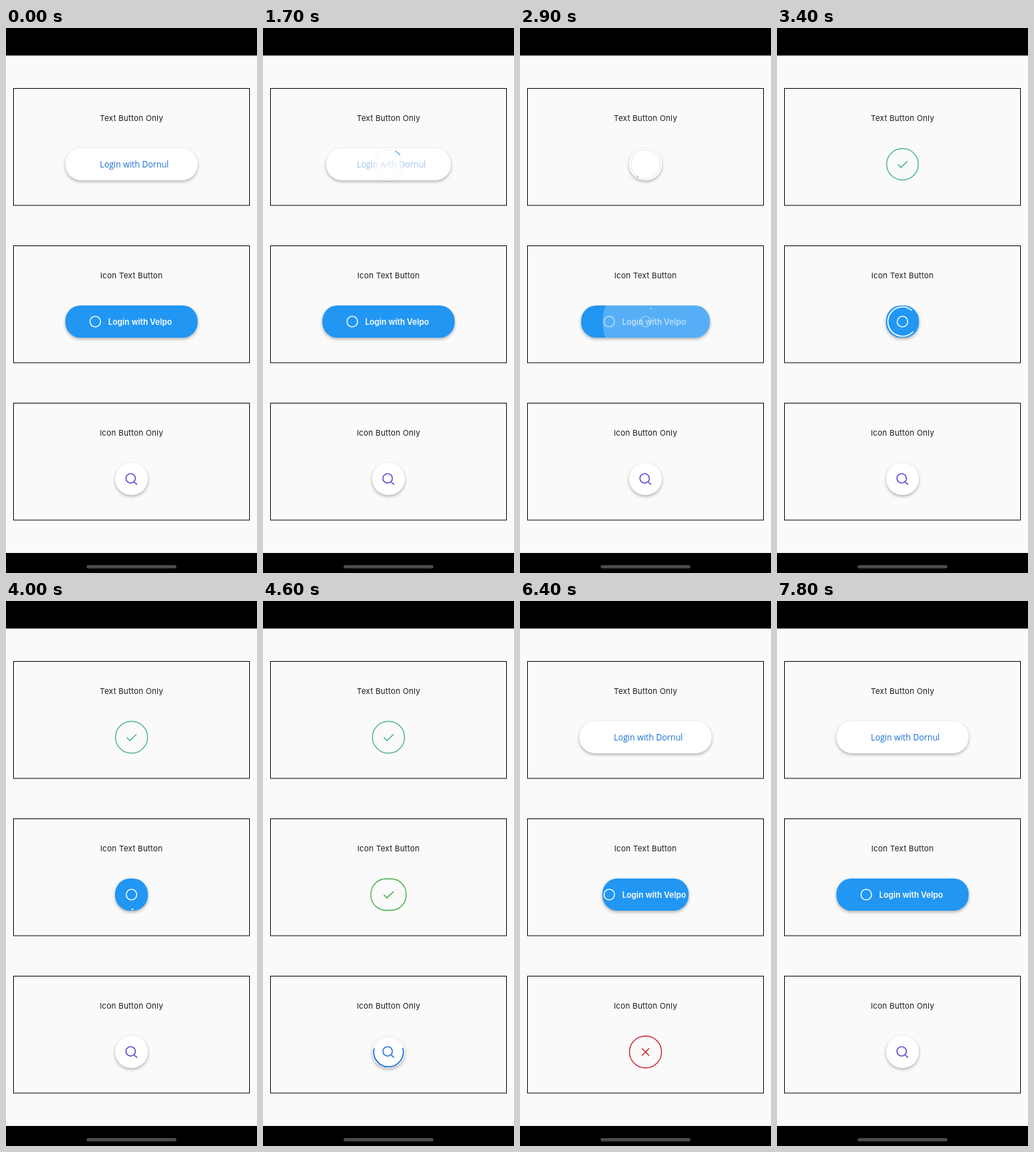
Write an HTML page that moves like this. It is 352 by 762 pixels and loops after 8.3 s.

```html
<!DOCTYPE html>
<html lang="en">
<head>
<meta charset="utf-8">
<title>Loading buttons</title>
<style>
  html, body { margin: 0; width: 100%; height: 100%; overflow: hidden; background: #fafafa; }
  svg { display: block; width: 352px; height: 762px; }
  .title { font: 400 11px Inter, sans-serif; letter-spacing: .18px; fill: #1c1c1c; text-anchor: middle; }
  .base { filter: drop-shadow(0 2.6px 1.9px rgba(0, 0, 0, .3)); }
  .line { fill: none; stroke-linecap: butt; }
</style>
</head>
<body>
<svg id="stage" viewBox="0 0 352 762" xmlns="http://www.w3.org/2000/svg"></svg>
<script>
const LOOP = 8300, STEP = 100;
const LOAD = 1400, BACK = 3465, RESIZE = 600;
const CX = 176, H = 45, ROUND = 46;
const stage = document.getElementById('stage');

function el(parent, tag, attrs, text) {
  const node = document.createElementNS('http://www.w3.org/2000/svg', tag);
  set(node, attrs);
  if (text) node.textContent = text;
  parent.appendChild(node);
  return node;
}
function set(node, attrs) {
  for (const key in attrs) node.setAttribute(key, attrs[key]);
}
const clamp = v => Math.min(1, Math.max(0, v));
const mix = (a, b, k) => a + (b - a) * k;

function bezier(x1, y1, x2, y2) {
  const at = (a, b, s) => 3 * a * s * (1 - s) ** 2 + 3 * b * s * s * (1 - s) + s ** 3;
  return x => {
    if (x <= 0) return 0;
    if (x >= 1) return 1;
    let lo = 0, hi = 1;
    for (let i = 0; i < 24; i++) {
      const mid = (lo + hi) / 2;
      if (at(x1, x2, mid) < x) lo = mid; else hi = mid;
    }
    return at(y1, y2, lo);
  };
}
const easeInOut = bezier(.42, 0, .58, 1);
const fastOutSlowIn = bezier(.4, 0, .2, 1);

function arcPath(cx, cy, r, from, sweep) {
  const point = deg => {
    const a = deg * Math.PI / 180;
    return (cx + r * Math.cos(a)).toFixed(2) + ' ' + (cy + r * Math.sin(a)).toFixed(2);
  };
  return `M${point(from)}A${r} ${r} 0 ${sweep > 180 ? 1 : 0} 1 ${point(from + sweep)}`;
}

// Indeterminate progress arc: the head grows, the tail follows, all of it turns.
function spinner(cy, r, ms) {
  const turn = ms / 2222, cycle = ms / 1333 % 1;
  const head = 270 * fastOutSlowIn(cycle * 2);
  const tail = 270 * fastOutSlowIn(cycle * 2 - 1);
  const from = -90 + tail + turn * 360 + cycle * 90;
  return arcPath(CX, cy, r, from, Math.max(head - tail, 3));
}

function lens(parent, cy, color) {
  el(parent, 'path', {
    class: 'line', stroke: color, 'stroke-width': 1.4,
    d: `M168.2 ${cy - .8}a6.6 6.6 0 1 0 13.2 0a6.6 6.6 0 1 0 -13.2 0M179.5 ${cy + 3.9}l4.3 4.2`
  });
}
function badge(parent, x, y) {
  el(parent, 'circle', { class: 'line', cx: x, cy: y, r: 7.4, stroke: '#fff', 'stroke-width': 1.4 });
}
function label(parent, x, y, text, font, fill) {
  el(parent, 'text', { x, y, fill, style: 'font:' + font }, text);
}

const tick = cy => `M169.4 ${cy + .2}l4.3 4.4l9.4 -8.9`;
const cross = cy => `M170.9 ${cy - 5}l10.2 10.2m0 -10.2l-10.2 10.2`;

const specs = [
  {
    title: 'Text Button Only', top: 84, start: 1585, full: 185.5, min: 104, rx: 22,
    fill: '#fff', arc: '#1f74d6', arcR: 20.8, done: '#52b498', doneW: 45, mark: tick,
    rest(g, cy) {
      label(g, 131.6, cy + 4.5, 'Login with Dornul', "400 11.7px 'Open Sans', sans-serif", '#1a6fd2');
    },
    load(g, cy) {
      el(g, 'circle', { cx: CX, cy, r: 20.4, fill: '#fff', stroke: '#e1e7ef' });
    }
  },
  {
    title: 'Icon Text Button', top: 304, start: 2820, full: 185.5, min: 121, rx: 21,
    fill: '#2196f3', arc: '#fff', arcR: 20.5, done: '#4caf50', doneW: 50, mark: tick, veil: true,
    rest(g, cy) {
      badge(g, 125.2, cy);
      label(g, 143.2, cy + 4, 'Login with Velpo', '600 11.2px Inter, sans-serif', '#fff');
    },
    load(g, cy) { badge(g, CX, cy); }
  },
  {
    title: 'Icon Button Only', top: 524, start: 4270, full: ROUND, min: ROUND, rx: 22.5,
    fill: '#fff', arc: '#1768dc', arcR: 20.8, done: '#c62c36', doneW: 45, mark: cross,
    rest(g, cy) { lens(g, cy, '#5b39cc'); },
    load(g, cy) {
      el(g, 'circle', { class: 'line', cx: CX, cy, r: 20.8, stroke: '#e9e8fa' });
      lens(g, cy, '#1768dc');
    }
  }
];

function build(s) {
  const cy = s.top + 106.5, y = cy - H / 2;
  el(stage, 'rect', { x: 10.5, y: s.top + .5, width: 331, height: 163.5, fill: 'none', stroke: '#111' });
  el(stage, 'text', { class: 'title', x: CX, y: s.top + 46 }, s.title);
  const base = el(stage, 'rect', { class: 'base', y, height: H, rx: s.rx, fill: s.fill });
  const veil = el(stage, 'path', { fill: '#fff' });
  const rest = el(stage, 'g');
  const load = el(stage, 'g');
  const done = el(stage, 'g');
  s.rest(rest, cy);
  s.load(load, cy);
  const arc = el(load, 'path', { class: 'line', stroke: s.arc, 'stroke-width': 1.6 });
  const ring = el(done, 'rect', { class: 'line', stroke: s.done, 'stroke-width': 1.35 });
  el(done, 'path', { class: 'line', stroke: s.done, 'stroke-width': 1.5, d: s.mark(cy) });

  return t => {
    const u = t - s.start, back = u >= BACK;
    const shrink = back ? 1 - easeInOut((u - BACK) / RESIZE) : easeInOut(u / RESIZE);
    const w = Math.max(mix(s.full, ROUND, shrink), back ? s.min : ROUND);
    const restIn = back ? clamp((u - BACK) / 60) : 1 - clamp(u / 200);
    const finish = clamp((u - LOAD) / 200);
    const loadIn = clamp(u / 200) * (1 - finish);
    const doneIn = finish * (1 - clamp((u - BACK) / 60));

    set(base, { x: CX - w / 2, width: w, opacity: 1 - doneIn });
    set(rest, { opacity: restIn });
    set(load, { opacity: loadIn });
    set(done, { opacity: doneIn });
    if (loadIn > 0) set(arc, { d: spinner(cy, s.arcR, u) });

    if (s.veil) {
      const end = CX + w / 2 - s.rx;
      set(veil, {
        opacity: u < LOAD ? loadIn * (1 - loadIn) : 0,
        d: `M120 ${y}Q112 ${cy} 119.5 ${y + H}H${end}a21 21 0 0 0 21 -21v-3a21 21 0 0 0 -21 -21Z`
      });
    }

    const grow = mix(-1.2, 0, easeInOut((u - LOAD) / 800));
    const rw = s.doneW + grow, rh = H - .4 + grow;
    set(ring, { x: CX - rw / 2, y: cy - rh / 2, width: rw, height: rh, rx: s.veil ? 21 : rh / 2 });
  };
}

el(stage, 'rect', { width: 352, height: 762, fill: '#fafafa' });
el(stage, 'rect', { width: 352, height: 38.5 });
el(stage, 'rect', { y: 734, width: 352, height: 28 });
el(stage, 'rect', { x: 113, y: 751, width: 126, height: 4.4, rx: 2.2, fill: '#4c4c4c' });
const buttons = specs.map(build);

function draw(ms) {
  const t = Math.floor(ms % LOOP / STEP) * STEP;
  buttons.forEach(update => update(t));
}
const origin = performance.now();
function frame() {
  draw(Math.max(0, performance.now() - origin));
  requestAnimationFrame(frame);
}
frame();
</script>
</body>
</html>
```
